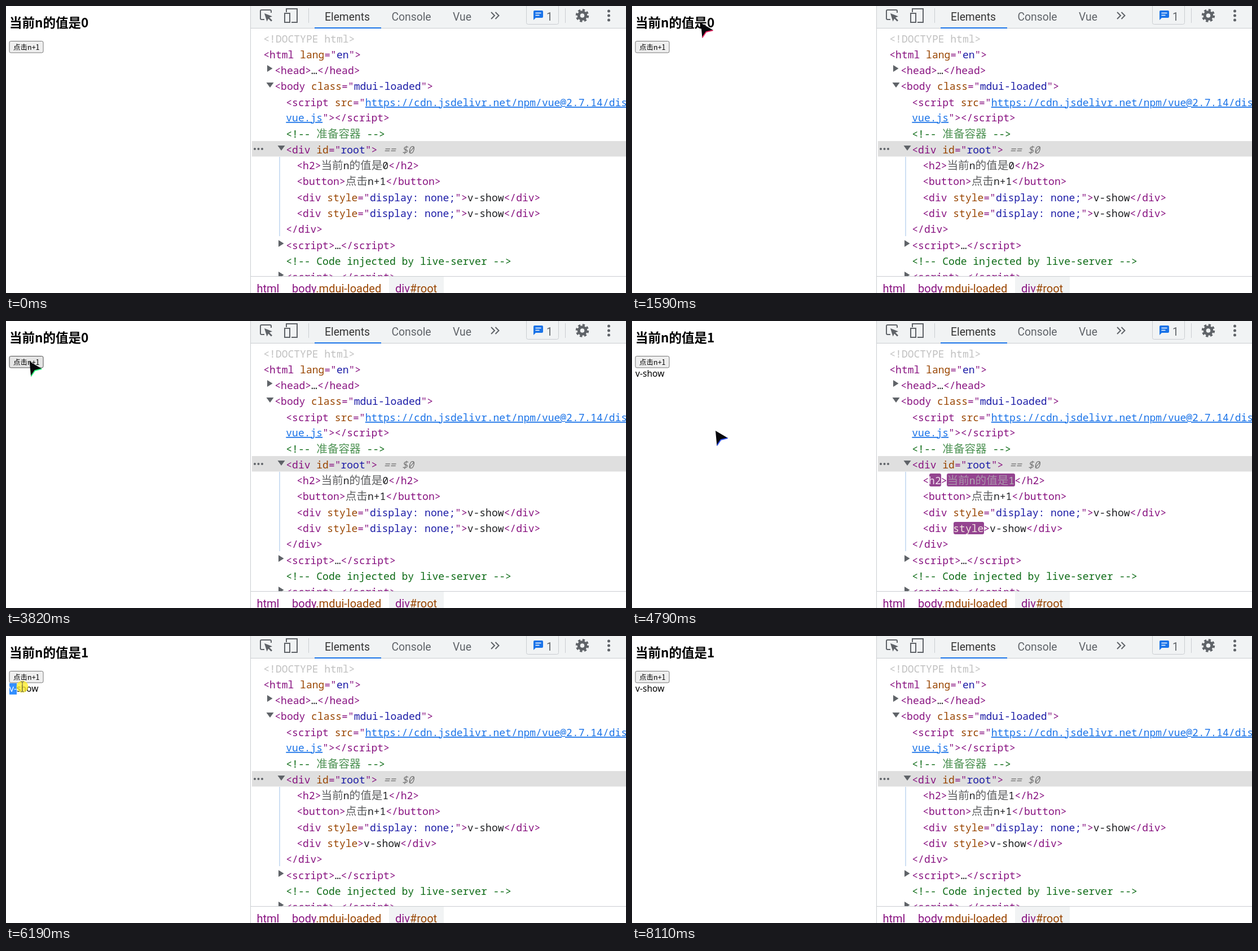
Write an HTML page that moves like this. It is 1099 px wide and 510 px high and loops after 8440 ms.

```html
<!DOCTYPE html>
<html lang="zh">
<head>
<meta charset="utf-8">
<style>
html, body { margin: 0; width: 100%; height: 100%; overflow: hidden; background: #fff; }
svg { display: block; }
text { white-space: pre; }
.page { font-family: "Noto Sans CJK SC", "Noto Sans CJK", sans-serif; fill: #000; }
.show { font: 15.6px "Noto Sans", sans-serif; }
.ui { font: 19.3px Roboto, sans-serif; fill: #5f6368; }
.code { font: 18px "Noto Sans Mono", "Noto Sans CJK SC", "Noto Sans CJK", monospace; }
.cjk { font: 300 19.6px "Noto Sans CJK SC", "Noto Sans CJK", sans-serif; fill-opacity: .72; }
.t { fill: #881280; } .a { fill: #994500; } .v { fill: #1a1aa6; }
.c { fill: #0b6a14; } .d { fill: #c0c0c0; } .x { fill: #202124; }
.l { fill: #1a73e8; text-decoration: underline 1.5px; text-underline-offset: 2px; }
.q { fill: #777; font-style: italic; }
.T { fill: color-mix(in srgb, #fff var(--w), #881280); }
.A { fill: color-mix(in srgb, #fff var(--w), #994500); }
.X { fill: color-mix(in srgb, #fff calc(var(--w) * .75), #202124); }
#flash { fill: color-mix(in srgb, #862e82 var(--w), #f5dbf4); }
.line { fill: none; stroke: #5f6368; stroke-width: 2; }
.rule { stroke: #cacdd1; fill: none; }
</style>
</head>
<body>
<svg id="stage" width="1099" height="510" viewBox="0 0 1099 510">
  <g class="page">
    <text id="title" x="6" y="38" font-size="22.5" font-weight="700"></text>
    <rect id="button" x="6" y="62.5" width="60" height="20.5" rx="2.5"/>
    <text x="13" y="77.500" font-size="12.5">点击n+1</text>
    <g id="shown">
      <text class="show" x="6" y="99">v-show</text>
      <clipPath id="picked"><rect id="pick" x="6" y="84" height="20"/></clipPath>
      <g clip-path="url(#picked)">
        <path d="M6 84h60v20H6z" fill="#338fff"/>
        <text class="show" x="6" y="99" fill="#fff">v-show</text>
      </g>
    </g>
  </g>

  <path d="M436 240H1099v27.500H436z" fill="#dfdfdf"/>
  <path id="hover" d="M439 438H1099v28H439z" fill="#edf3fd"/>
  <path d="M485 268v141" stroke="#cfe0f4" stroke-width="2"/>
  <g id="flash">
    <rect x="527" y="271" width="21" height="23" rx="3"/>
    <rect x="558" y="271" width="121" height="23" rx="3"/>
    <rect x="570" y="357" width="54" height="22" rx="3"/>
  </g>
  <g id="code" class="code" transform="translate(-.7 .9)"></g>
  <g fill="#5f6368">
    <path d="M463 105l9.500 6-9.500 6zM461.500 136h13l-6.500 9zM481.500 248h13l-6.500 9zM483 416l9.500 6-9.500 6zM483 472l9.500 6-9.500 6z"/>
    <circle cx="441" cy="254" r="2"/><circle cx="447.500" cy="254" r="2"/><circle cx="454" cy="254" r="2"/>
  </g>

  <path d="M434 481H1099v29H434z" fill="#fff"/>
  <path d="M679 481h97v29h-97z" fill="#f1f3f4"/>
  <path d="M434 480.500H1099" class="rule"/>
  <g class="ui" style="font-size:20px">
    <text class="t" x="444.500" y="509">html</text>
    <text class="t" x="507" y="509">body<tspan class="a">.mdui-loaded</tspan></text>
    <text class="t" x="690" y="509">div<tspan class="a">#root</tspan></text>
  </g>

  <path d="M434 0H1099v39H434z" fill="#f1f3f4"/>
  <path d="M434 39.500H1099M433.500 0V510M536.500 4v26M991.500 4v26" class="rule"/>
  <path d="M547 39h118" stroke="#1a73e8" stroke-width="2"/>
  <g class="ui">
    <text x="565" y="25.500" style="fill:#333">Elements</text>
    <text x="683.500" y="25.500">Console</text>
    <text x="792" y="25.500">Vue</text>
  </g>
  <g class="line">
    <path d="M470 12V9a2 2 0 0 0-2-2H453a2 2 0 0 0-2 2v13a2 2 0 0 0 2 2h5"/>
    <path d="M497 11V5h19v24h-10M494 13h9v16h-9z"/>
    <path d="M860 11l6 6-6 6M867.500 11l6 6-6 6"/>
    <circle cx="1021.500" cy="17" r="6.300" stroke-width="5"/>
    <circle cx="1021.500" cy="17" r="10" stroke-width="3.500" stroke-dasharray="4.200 3.654"/>
  </g>
  <path d="M458 13l14 5.500-5 2 5 5-2 2-5-5-2.500 5z" fill="#5f6368"/>
  <rect x="922.500" y="-4" width="57" height="36.500" rx="3" class="rule"/>
  <path d="M937 8h13a2 2 0 0 1 2 2v9a2 2 0 0 1-2 2H939l-4 4V10a2 2 0 0 1 2-2z" fill="#1a73e8"/>
  <path d="M938.500 12.500h10M938.500 16.500h7" stroke="#fff" stroke-width="1.600"/>
  <text class="ui" x="958" y="25.500">1</text>
  <g fill="#5f6368"><circle cx="1068.500" cy="9" r="2.500"/><circle cx="1068.500" cy="17" r="2.500"/><circle cx="1068.500" cy="25" r="2.500"/></g>

  <g id="cursor">
    <circle id="press" r="10.500" fill="#ffec1f" opacity=".75"/>
    <path id="beam" d="M-3 -9h2l1 1 1-1h2M0 -8V8M-3 9h2l1-1 1 1h2" fill="none" stroke="#555"/>
    <g id="arrow">
      <path d="M0 0L22 13 9.500 16 2.500 27z" fill="#08080c"/>
      <path id="glow" d="M21.500 13.200L9.500 16 2.800 26" fill="none" stroke-width="1.800"/>
    </g>
  </g>
</svg>
<script>
const $ = id => document.getElementById(id);
const LOOP = 8440, CLICK = 4630, FLASH = 4650;

// Each row: x, y, parts split by "|" (first letter is the class), optional state.
const rows = [
  [457, 64, 'd<!DOCTYPE html>'],
  [457, 92, 't<html |alang|t="|ven|t">'],
  [477, 120, 't<head>|x…|t</head>'],
  [477, 148, 't<body |aclass|t="|vmdui-loaded|t">'],
  [497, 177, 't<script |asrc|t="|lhttps://cdn.jsdelivr.net/npm/vue@2.7.14/dist/'],
  [497, 204, 'lvue.js|t"></script' + '>'],
  [497, 233, 'c<!-- 准备容器 -->'],
  [497, 261, 't<div |aid|t="|vroot|t">|q == $0'],
  [516, 289, 't<h2>|x当前n的值是0|t</h2>', 'before'],
  [516, 289, 't<|Th2|t>|X当前n的值是1|t</h2>', 'after'],
  [516, 317, 't<button>|x点击n+1|t</button>'],
  [516, 346, 't<div |astyle|t="|vdisplay: none;|t">|xv-show|t</div>'],
  [516, 374, 't<div |astyle|t="|vdisplay: none;|t">|xv-show|t</div>', 'before'],
  [516, 374, 't<div |Astyle|t>|xv-show|t</div>', 'after'],
  [497, 402, 't</div>'],
  [497, 431, 't<script>|x…|t</script' + '>'],
  [497, 459, 'c<!-- Code injected by live-server -->'],
  [497, 487, 't<script>|x…|t</script' + '>']
];

function add(parent, name, cls, text = '') {
  const node = document.createElementNS('http://www.w3.org/2000/svg', name);
  node.setAttribute('class', cls);
  node.textContent = text;
  return parent.appendChild(node);
}

for (const [x, y, parts, state = ''] of rows) {
  const line = add($('code'), 'text', state);
  line.setAttribute('x', x);
  line.setAttribute('y', y);
  for (const part of parts.split('|')) {
    const span = add(line, 'tspan', part[0]);
    for (const run of part.slice(1).split(/([\u4e00-\u9fff]+)/))
      if (run) add(span, 'tspan', run > '\u4e00' ? 'cjk' : '', run);
  }
}

// Pointer: time, x, y
const path = [
  [200, 250, 515], [330, 200, 400], [540, 140, 258], [1030, 146, 177],
  [1300, 130, 60], [1600, 122, 30], [1940, 140, 20], [2010, 140, 20],
  [2250, 175, 70], [2560, 180, 96], [2840, 150, 110], [3200, 100, 100],
  [3550, 42, 72], [4650, 40, 72], [4790, 148, 195], [4900, 192, 248],
  [5400, 188, 240], [5630, 150, 200], [6050, 7, 92], [6190, 29, 90],
  [6400, 66, 91], [6600, 66, 91], [6900, 120, 150], [7240, 362, 315], [7370, 500, 475]
];
const hues = [[200, 273], [540, 290], [2560, 390], [4790, 590], [7240, 670], [7400, 676]];
const edges = [0, 7.9, 13, 20.4, 30, 39.5, 52];

const within = (t, a, b) => t >= a && t < b;
const show = (node, on) => { node.style.display = on ? '' : 'none'; };

function along(keys, t, ease) {
  const i = Math.max(1, keys.findIndex(k => k[0] > t));
  const a = keys[i - 1], b = keys[i];
  const p = ease((t - a[0]) / (b[0] - a[0]));
  return a.slice(1).map((v, n) => v + (b[n + 1] - v) * p);
}

function draw(t) {
  const clicked = t >= CLICK;
  $('title').textContent = '当前n的值是' + (clicked ? 1 : 0);
  show($('shown'), clicked);
  document.querySelectorAll('.before').forEach(n => show(n, !clicked));
  document.querySelectorAll('.after').forEach(n => show(n, clicked));

  const over = within(t, 3480, 4710);
  $('button').setAttribute('fill', over ? '#e5e5e5' : '#efefef');
  $('button').setAttribute('stroke', over ? '#4f4f4f' : '#767676');

  const age = Math.max(0, t - FLASH) / 1400;
  $('stage').style.setProperty('--w', 100 * Math.max(0, 1 - age / 0.8) + '%');
  show($('flash'), clicked && age < 1);
  $('flash').style.opacity = Math.min(1, (1 - age) / 0.2);

  show($('hover'), within(t, 7340, 8110));
  $('hover').style.opacity = t < 7980 ? 1 : 0.5;

  const moving = within(t, 200, 7370);
  show($('cursor'), moving);
  let width = 0;
  if (moving) {
    const [x, y] = along(path, t, p => p * p * (3 - 2 * p));
    const beam = within(t, 6030, 6640);
    $('cursor').setAttribute('transform', `translate(${x} ${y})`);
    show($('beam'), beam);
    show($('arrow'), !beam);
    show($('press'), within(t, 4560, 4650) || within(t, 6050, 6420) || within(t, 6560, 6620));
    $('glow').setAttribute('stroke', `hsl(${along(hues, t, p => p)[0] % 360} 95% 58%)`);
    if (within(t, 6050, 6560)) width = Math.max(...edges.filter(e => e <= Math.max(0, x - 14)));
  }
  $('pick').setAttribute('width', width);
}

const start = performance.now();
function tick() {
  draw((performance.now() - start) % LOOP);
  requestAnimationFrame(tick);
}
tick();
</script>
</body>
</html>
```
